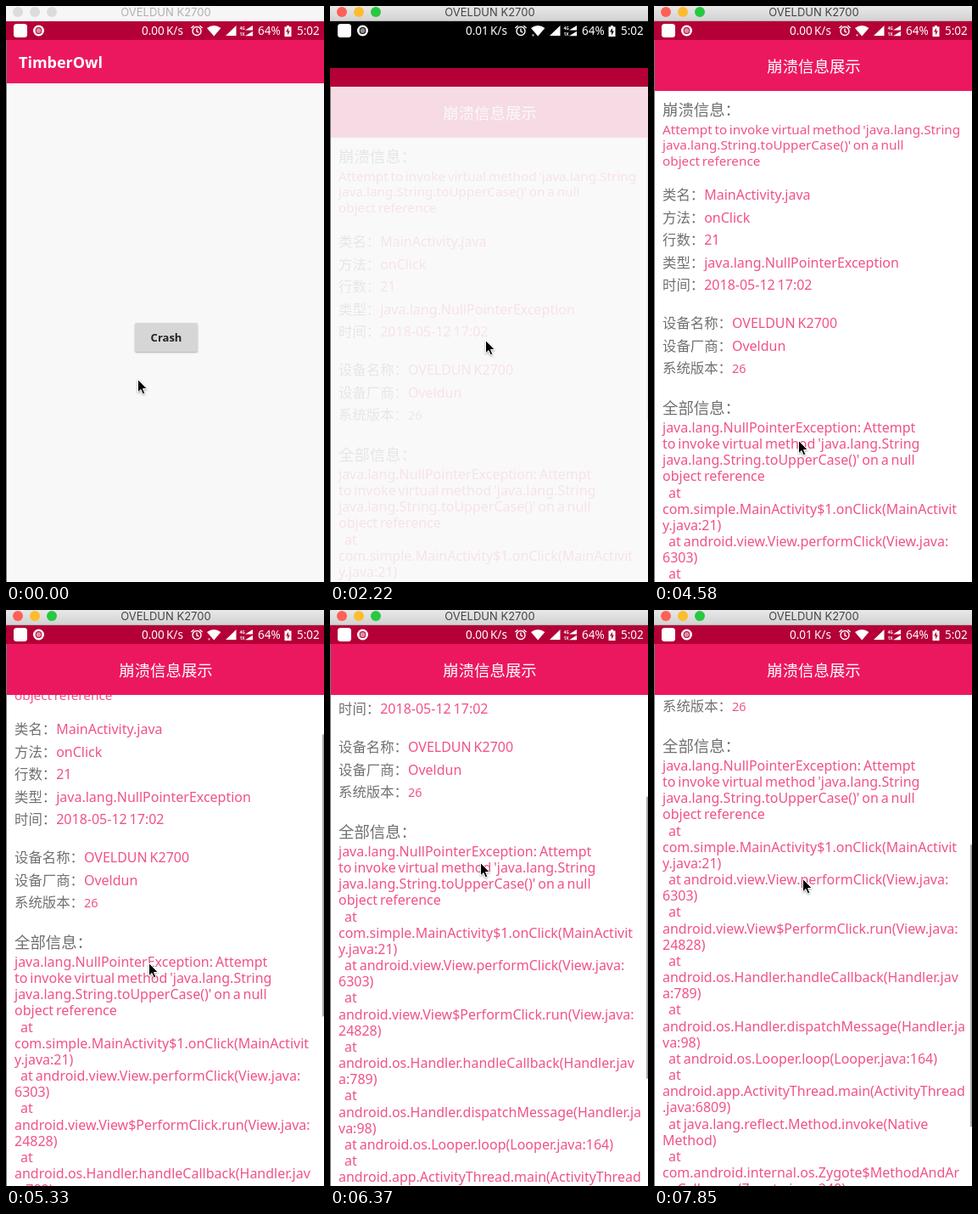
Write an HTML page that moves like this. It is 375 px wide and 678 px high and loops after 7990 ms.

```html
<!DOCTYPE html>
<html lang="zh-CN">
<head>
<meta charset="utf-8">
<title>Crash report</title>
<style>
html, body { margin: 0; width: 100%; height: 100%; overflow: hidden; background: #000; }
#stage {
  position: relative; width: 375px; height: 678px; overflow: hidden; background: #000;
  font: 16px/20px 'Noto Sans', 'Noto Sans CJK SC', sans-serif; word-spacing: -.08em;
}
#stage div, #stage svg { position: absolute; }
#stage p { position: absolute; margin: 0; white-space: pre; }

.window { left: 0; top: 18px; width: 375px; height: 660px; }
.strip { left: 0; top: 0; width: 375px; height: 22px; background: #b40037; }
.body { left: 0; top: 22px; width: 375px; height: 638px; overflow: hidden; background: #f8f8f8; }
.edge { left: 0; top: 0; width: 1px; height: 638px; background: #777; }
.bar { left: 0; top: 0; width: 375px; background: #ec185f; color: #fff; }

#home .bar { height: 51px; }
#home .bar p { left: 15px; top: 16px; font-size: 18px; font-weight: 700; }
#button {
  left: 152px; top: 333px; width: 74px; height: 34px; border-radius: 2px;
  background: #d6d6d6; box-shadow: 0 1px 2px rgba(0,0,0,.3);
  font: 600 13px/34px 'Noto Sans', sans-serif; text-align: center; color: #222;
}

#report .body { background: #f9f9f9; }
#content { left: 0; top: 0; width: 375px; height: 638px; background: #fff; }
#content .bar { height: 59.5px; }
#content .bar p { width: 375px; left: 1px; top: 21px; font-size: 18.4px; text-align: center; }
#view { left: 0; top: 59.5px; width: 375px; height: 579px; overflow: hidden; }
#list { left: 10px; top: -99.5px; color: #f0528a; }
#list .head { font-size: 18.4px; color: #707070; }
#list .msg { font-size: 15.3px; }
#list b { font-weight: 400; font-size: 16.4px; color: #707070; }
#list .small { font-size: 14.5px; }
#thumb { left: 373px; top: 0; width: 2px; height: 332px; background: #aaa; }

#status { left: 0; top: 18px; width: 375px; height: 22px; color: #fff; font-size: 13.5px; }
#status p { top: 1px; }
#status svg { left: 0; top: 0; }

#title {
  left: 0; top: 0; width: 375px; height: 18px; box-sizing: border-box;
  background: linear-gradient(#e8e8e8, #d3d3d3); border-bottom: 1px solid #b4b4b4;
  font: 13px/15px Inter, sans-serif; word-spacing: 0; color: #444; text-align: center;
}
#title p { left: 1px; width: 375px; top: 0; }
#title i { position: absolute; top: 1px; width: 12px; height: 12px; border-radius: 50%; }
#title.idle { background: #f6f6f6; border-color: #f0f0f0; color: #b0b0b0; }
#title.idle i { background: #dcdcdc !important; }
#cursor { left: 0; top: 0; overflow: visible; filter: drop-shadow(0 1px 1px rgba(0,0,0,.35)); }
</style>
</head>
<body>
<div id="stage">
  <div id="home" class="window">
    <div class="strip"></div>
    <div class="body">
      <div class="bar"><p>TimberOwl</p></div>
      <div id="button">Crash</div>
      <div class="edge"></div>
    </div>
  </div>

  <div id="report" class="window">
    <div class="strip"></div>
    <div class="body">
      <div id="content">
        <div id="view"><div id="list"></div><div id="thumb"></div></div>
        <div class="bar"><p>崩溃信息展示</p></div>
      </div>
      <div class="edge"></div>
    </div>
  </div>

  <div id="status">
    <svg width="375" height="22" viewBox="0 18 375 22" fill="#fff">
      <rect x="9" y="21" width="16" height="16" rx="3.5"/>
      <circle cx="38.5" cy="29" r="5.2" fill="none" stroke="#fff" stroke-width="2.6"/>
      <circle cx="38.5" cy="29" r="3" opacity=".55"/>
      <g fill="none" stroke="#fff" stroke-width="1.4">
        <circle cx="225" cy="29.5" r="5"/>
        <path d="M225 26.5v3.3l2.3 1.4M218.4 26l3.2-2.8M231.6 26l-3.2-2.8"/>
      </g>
      <path d="M237 26q8.200-6 16.400 0L245.200 35.500z"/>
      <path id="traffic" d="M238 33.500h3l-1.500 2.500z" opacity=".8"/>
      <path d="M271.500 23v12h-12.500zM291 23v5.500h-9zM291 29.800v5.500h-9z"/>
      <g font-family="'Noto Sans', sans-serif" font-size="5" font-weight="700">
        <text x="275.500" y="27.500">4G</text><text x="275.500" y="35">1X</text>
      </g>
      <path fill-rule="evenodd" d="M328.500 24.500h2.500v-1.500h3v1.500h2.500v11.500h-8zM333 25.800l-3 4.700h2v3.800l3-4.800h-2z"/>
    </svg>
    <p id="speed" style="left:160px"></p>
    <p style="left:297px">64%</p>
    <p style="left:343px">5:02</p>
  </div>

  <div id="title">
    <i style="left:8px;background:#ff5f57"></i>
    <i style="left:28px;background:#febc2e"></i>
    <i style="left:48px;background:#28c840"></i>
    <p>OVELDUN K2700</p>
  </div>

  <svg id="cursor" width="12" height="19">
    <path d="M.5 .5v15.300l3.500-3.300 2.300 5.300 2.500-1.100-2.300-5.200h4.800z" fill="#000" stroke="#fff"/>
  </svg>
</div>

<script>
const $ = id => document.getElementById(id);

// ---- report text ----
function addLine(y, html, cls = '') {
  $('list').insertAdjacentHTML('beforeend', `<p class="${cls}" style="top:${y - 10}px">${html}</p>`);
}
const addLines = (y, pitch, text, cls) =>
  text.split('\n').forEach((line, i) => addLine(y + i * pitch, line, cls));
const row = (label, value, cls = '') => `<b>${label}：</b><span class="${cls}">${value}</span>`;

addLine(122, '崩溃信息：', 'head');
addLines(144.5, 18.5, `Attempt to invoke virtual method 'java.lang.String
java.lang.String.toUpperCase()' on a null
object reference`, 'msg');
addLines(222, 26.5, [
  row('类名', 'MainActivity.java'),
  row('方法', 'onClick'),
  row('行数', '21'),
  row('类型', 'java.lang.NullPointerException'),
  row('时间', '2018-05-12 17:02')
].join('\n'));
addLines(373, 26.7, [
  row('设备名称', 'OVELDUN K2700'),
  row('设备厂商', 'Oveldun'),
  row('系统版本', '26', 'small')
].join('\n'));
addLine(472.5, '全部信息：', 'head');
addLines(496, 19.16, `java.lang.NullPointerException: Attempt
to invoke virtual method 'java.lang.String
java.lang.String.toUpperCase()' on a null
object reference
  at
com.simple.MainActivity$1.onClick(MainActivit
y.java:21)
  at android.view.View.performClick(View.java:
6303)
  at
android.view.View$PerformClick.run(View.java:
24828)
  at
android.os.Handler.handleCallback(Handler.jav
a:789)
  at
android.os.Handler.dispatchMessage(Handler.ja
va:98)
  at android.os.Looper.loop(Looper.java:164)
  at
android.app.ActivityThread.main(ActivityThread
.java:6809)
  at java.lang.reflect.Method.invoke(Native
Method)
  at
com.android.internal.os.Zygote$MethodAndAr
gsCaller.run(Zygote.java:240)`);

// ---- motion: [tick, value] keys, the screen refreshes once per tick ----
const LOOP = 7990, TICK = 148;
const tracks = {
  x: [[0, 155], [4, 183], [20, 183], [25, 168], [27, 170], [32, 170], [36, 168], [43, 177], [53, 175]],
  y: [[0, 439], [4, 393], [20, 393], [25, 518], [27, 511], [31, 511], [32, 492], [36, 415],
      [43, 297], [47, 430], [48, 430], [49, 412], [53, 316]],
  scroll: [[31, 0], [32, 5], [36, 82.4], [43, 212.5], [48, 212.5], [49, 217], [53, 313]],
  slide: [[14, 80], [15, 55], [16, 14], [17, 3], [18, 0]],
  shade: [[14, .5], [15, 1]],
  fade: [[14, 0], [15, .13], [16, .6], [17, .92], [18, 1]],
  thumb: [[20, 1], [23, 0], [31, 0], [32, 1], [43, 1], [46, 0], [48, 0], [49, 1]]
};

function at(name, t) {
  const keys = tracks[name];
  const i = keys.findIndex(k => k[0] > t);
  if (i === 0) return keys[0][1];
  if (i < 0) return keys[keys.length - 1][1];
  const [t0, a] = keys[i - 1], [t1, b] = keys[i];
  return a + (b - a) * (t - t0) / (t1 - t0);
}

const show = (id, on) => { $(id).style.visibility = on ? 'visible' : 'hidden'; };

function draw(ms) {
  const t = Math.floor((ms + 9) / TICK);
  const scroll = at('scroll', t);
  show('home', t < 12);
  show('report', t >= 14);
  show('traffic', t >= 6 && t < 37);
  $('title').className = t < 11 ? 'idle' : '';
  $('speed').textContent = (t >= 9 && t < 29) || t >= 49 ? '0.01 K/s' : '0.00 K/s';
  $('report').style.transform = `translateY(${at('slide', t)}px)`;
  $('report').style.opacity = at('shade', t);
  $('content').style.opacity = at('fade', t);
  $('list').style.transform = `translateY(${-scroll}px)`;
  $('thumb').style.transform = `translateY(${scroll * .563}px)`;
  $('thumb').style.opacity = at('thumb', t);
  $('cursor').style.transform = `translate(${at('x', t)}px, ${at('y', t)}px)`;
}

const start = performance.now();
function loop() {
  draw((performance.now() - start) % LOOP);
  requestAnimationFrame(loop);
}
loop();
</script>
</body>
</html>
```
